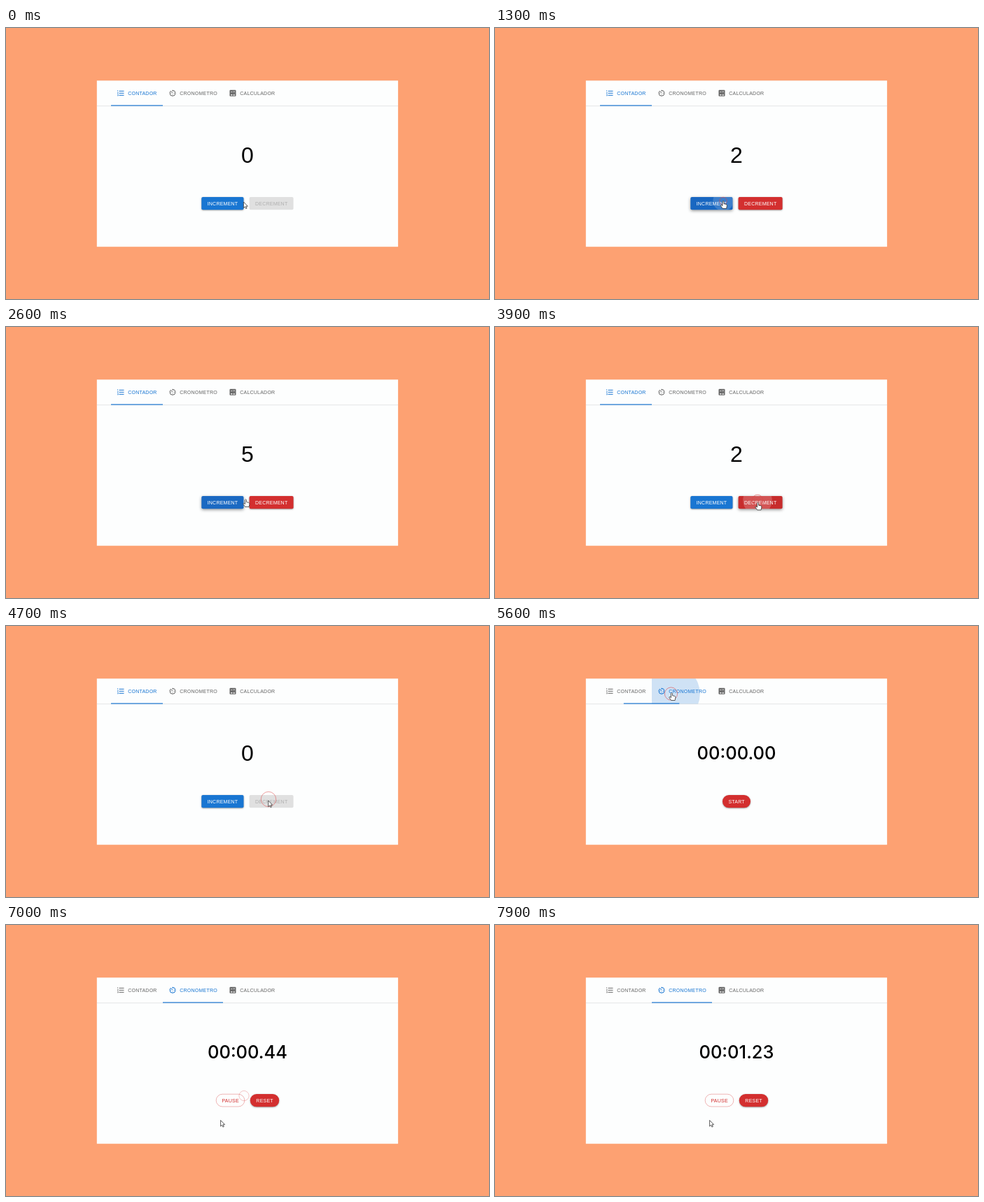
An HTML page with a canvas for the animation above (8000 ms loop, 690x388 px).

```html
<!DOCTYPE html>
<html lang="es">
<head>
<meta charset="utf-8">
<title>Contador</title>
<style>
html, body { margin: 0; width: 100%; height: 100%; overflow: hidden; background: #fda172; }
canvas { display: block; width: 690px; height: 388px; }
</style>
</head>
<body>
<canvas id="stage"></canvas>
<script>
const W = 690, H = 388, LOOP = 8000;
const BLUE = '#1976d2', GREY = '#666', RED = '#d32f2f';
const SANS = '"Liberation Sans", Arial, sans-serif';
const HOLD = 130, RIPPLE = 550;
const TAB_SWITCH = 5500, TIMER_START = 6500;

const canvas = document.getElementById('stage');
const dpr = window.devicePixelRatio || 1;
canvas.width = W * dpr;
canvas.height = H * dpr;
const ctx = canvas.getContext('2d');

const clamp = v => Math.max(0, Math.min(1, v));
const mix = (a, b, p) => a + (b - a) * p;
const mixRgb = (a, b, p) => `rgb(${a.map((v, i) => Math.round(mix(v, b[i], p)))})`;

// cubic-bezier(.4, 0, .2, 1)
function ease(x) {
  x = clamp(x);
  let lo = 0, hi = 1;
  for (let i = 0; i < 20; i++) {
    const s = (lo + hi) / 2, q = 1 - s;
    if (1.2 * q * q * s + .6 * q * s * s + s * s * s < x) lo = s; else hi = s;
  }
  return lo * lo * (3 - 2 * lo);
}

const inc = { x: 279.3, w: 60.2, label: 'INCREMENT', base: [25, 118, 210], dark: [21, 101, 192], hover: [110, 2580] };
const dec = { x: 347.6, w: 63, label: 'DECREMENT', base: [211, 47, 47], dark: [198, 40, 40], hover: [2660, 4700] };
const start = { x: 325, w: 40, r: 9.1, label: 'START', base: dec.base, dark: dec.dark, hover: [6330, 6500] };
const reset = { x: 348.8, w: 41.4, r: 9.1, label: 'RESET', base: dec.base, dark: dec.dark, hover: [9000, 9999] };
const tabs = [
  { x: 150, w: 74, label: 'CONTADOR', icon: listIcon },
  { x: 224, w: 86, label: 'CRONOMETRO', icon: timerIcon },
  { x: 310, w: 83, label: 'CALCULADOR', icon: calcIcon }
];

const press = (on, t, x, y, life = 250, size = 12) => ({ on, t, up: t + HOLD, x, y, life, size });
const clicks = [
  ...[780, 1150, 1490, 1820, 2120].map(t => press(inc, t, 326, 247.5)),
  ...[3040, 3390, 3700, 4080, 4420].map(t => press(dec, t, 375, 248)),
  press(tabs[1], TAB_SWITCH - HOLD, 251.5, 97),
  press(start, TIMER_START - HOLD, 340, 244.5, 600, 7.2)
];

// time, x, y, hand
const path = [
  [0, 339.4, 249, 0], [90, 339.4, 249, 0], [110, 336, 248.5, 1], [250, 326, 247.5, 1],
  [2520, 326, 247.5, 1], [2600, 342.5, 246.5, 1], [2800, 375.5, 251, 1],
  [4560, 375.5, 251, 0], [4680, 375.5, 251, 0], [5100, 256, 108, 1], [5200, 252.5, 95.5, 1],
  [6120, 252.5, 95.5, 1], [6170, 262, 112, 0], [6340, 340, 246, 1],
  [6540, 340, 246, 0], [6850, 306.6, 279.6, 0], [LOOP, 306.6, 279.6, 0]
];

function text(str, x, y, color, size = 7.06, align = 'left') {
  ctx.font = `${size}px ${SANS}`;
  ctx.letterSpacing = size < 10 ? '.2px' : '0px';
  ctx.textAlign = align;
  ctx.fillStyle = color;
  ctx.fillText(str, x, y);
}

function box(x, y, w, h, r) {
  ctx.beginPath();
  ctx.roundRect(x, y, w, h, r);
}

function disc(x, y, r) {
  ctx.beginPath();
  ctx.arc(x, y, r, 0, Math.PI * 2);
}

function line(...p) {
  ctx.beginPath();
  for (let i = 0; i < p.length; i += 2) ctx.lineTo(p[i], p[i + 1]);
  ctx.stroke();
}

function listIcon() {
  for (const y of [5, 11, 17]) ctx.fillRect(7, y, 14, 2);
  ctx.fill(new Path2D('M2 17h2v.5H3v1h1v.5H2v1h3v-4H2zM3 8h1V4H2v1h1zM2 11h1.8L2 13.1v.9h3v-1H3.2L5 10.9V10H2z'));
}

function timerIcon() {
  ctx.lineWidth = 2;
  ctx.beginPath();
  ctx.arc(12, 12, 8, -Math.PI / 2, Math.PI * 1.23);
  ctx.stroke();
  line(12, 3, 12, 7);
  line(5.9, 5.5, 12.7, 12.3);
  for (const [x, y] of [[7, 12], [17, 12], [12, 17]]) { disc(x, y, 1); ctx.fill(); }
}

function calcIcon() {
  box(3, 3, 18, 18, 2);
  ctx.fill();
  ctx.strokeStyle = '#fff';
  ctx.lineWidth = 1.5;
  line(6.2, 8.5, 11.2, 8.5);
  line(13, 15.7, 18, 15.7);
  line(13, 18.2, 18, 18.2);
  line(6, 17, 11, 17);
  line(8.5, 14.5, 8.5, 19.5);
  line(13.7, 6.3, 17.3, 9.9);
  line(17.3, 6.3, 13.7, 9.9);
}

// Ripples are clipped to the current path.
function ripples(owner, t, y, h, color) {
  ctx.save();
  ctx.clip();
  ctx.fillStyle = color;
  for (const c of clicks) {
    if (c.on !== owner || t < c.t || t > c.up + RIPPLE) continue;
    const e = ease((t - c.t) / RIPPLE);
    const rx = Math.max(c.x - owner.x, owner.x + owner.w - c.x) + 1;
    const ry = Math.max(c.y - y, y + h - c.y) + 1;
    ctx.globalAlpha = mix(.1, .3, e) * (1 - ease((t - c.up) / RIPPLE));
    disc(c.x, c.y, Math.hypot(rx, ry) * e);
    ctx.fill();
  }
  ctx.restore();
}

function button(b, t, disabled) {
  const y = 242, h = 18.3;
  const [from, to] = b.hover;
  const p = ease((t - from) / 250) - ease((t - to) / 250);
  ctx.save();
  box(b.x, y, b.w, h, b.r || 2);
  if (disabled) {
    ctx.fillStyle = '#e0e0e0';
    ctx.fill();
  } else {
    ctx.shadowColor = 'rgba(0,0,0,.42)';
    ctx.shadowBlur = mix(2.2, 4.5, p) * dpr;
    ctx.shadowOffsetY = mix(.8, 1.4, p) * dpr;
    ctx.fillStyle = mixRgb(b.base, b.dark, p);
    ctx.fill();
  }
  ctx.restore();
  text(b.label, b.x + b.w / 2 + .1, 253.7, disabled ? '#b0b0b0' : '#fff', 7.06, 'center');
  if (!disabled) {
    box(b.x, y, b.w, h, b.r || 2);
    ripples(b, t, y, h, '#fff');
  }
}

function drawTabs(t) {
  const active = t < TAB_SWITCH ? 0 : 1;
  ctx.fillStyle = '#e0e2e3';
  ctx.fillRect(130, 111.3, 430, .8);
  tabs.forEach((tab, i) => {
    const color = i === active ? BLUE : GREY;
    ctx.save();
    ctx.translate(tab.x + 8, 87.3);
    ctx.scale(.5, .5);
    ctx.fillStyle = ctx.strokeStyle = color;
    tab.icon();
    ctx.restore();
    text(tab.label, tab.x + 24.2, 95.6, color);
    box(tab.x, 75.3, tab.w, 36.2, 0);
    ripples(tab, t, 75.3, 36.2, BLUE);
  });
  const p = ease((t - TAB_SWITCH) / 300);
  ctx.fillStyle = BLUE;
  ctx.fillRect(mix(150, 224, p), 110.4, mix(74, 86, p), 1.2);
}

function drawCounter(t) {
  let n = 0;
  for (const c of clicks) {
    if (t < c.up) continue;
    if (c.on === inc) n++;
    if (c.on === dec) n--;
  }
  text(n, 345, 193.3, '#000', 32, 'center');
  button(inc, t);
  button(dec, t, n === 0);
}

function drawTimer(t) {
  const cs = Math.max(0, Math.floor((t - TIMER_START) * .0878 + .2));
  const two = v => String(v).padStart(2, '0');
  ctx.font = '500 25.5px Inter, "Open Sans", sans-serif';
  ctx.letterSpacing = '0px';
  ctx.textAlign = 'center';
  ctx.fillStyle = '#000';
  ctx.fillText(`00:${two(Math.floor(cs / 100))}.${two(cs % 100)}`, 345, 191);
  if (t < TIMER_START) return button(start, t);
  box(300.2, 242.2, 40.6, 17.8, 8.9);
  ctx.strokeStyle = 'rgba(211,47,47,.5)';
  ctx.lineWidth = .7;
  ctx.stroke();
  text('PAUSE', 320.6, 253.7, RED, 7.06, 'center');
  button(reset, t);
}

function drawRing(t) {
  for (const c of clicks) {
    const u = (t - c.up) / c.life;
    if (t < c.t || u > 1) continue;
    const v = clamp(u);
    disc(c.x, c.y, mix(4, c.size, 1 - (1 - v) ** 2));
    ctx.strokeStyle = `rgba(222,70,70,${.65 * (1 - v ** 4)})`;
    ctx.lineWidth = .9;
    ctx.stroke();
  }
}

const arrow = new Path2D('M0 0V8.6L2 6.8 3.3 9.6 4.7 9 3.4 6.2H6z');
const hand = new Path2D('M-1 1Q0-.7 1 1V4.2L4 4.8Q5.6 5.2 5.4 7L4.6 11H-.8L-3.6 7Q-3.8 5.6-2.4 6L-1 7z');

function drawCursor(t) {
  let i = 0;
  while (i < path.length - 2 && t >= path[i + 1][0]) i++;
  const a = path[i], b = path[i + 1];
  const u = clamp((t - a[0]) / (b[0] - a[0]));
  const p = u * u * (3 - 2 * u);
  const shape = a[3] ? hand : arrow;
  ctx.save();
  ctx.translate(mix(a[1], b[1], p), mix(a[2], b[2], p));
  ctx.fillStyle = '#fff';
  ctx.strokeStyle = '#333';
  ctx.lineWidth = .8;
  ctx.lineJoin = 'round';
  ctx.fill(shape);
  ctx.stroke(shape);
  ctx.restore();
}

function draw(now) {
  const t = now % LOOP;
  ctx.setTransform(dpr, 0, 0, dpr, 0, 0);
  ctx.fillStyle = '#fda172';
  ctx.fillRect(0, 0, W, H);
  ctx.fillStyle = '#fdfefe';
  ctx.fillRect(129.8, 75.3, 430.3, 237.9);
  drawTabs(t);
  (t < TAB_SWITCH ? drawCounter : drawTimer)(t);
  drawRing(t);
  drawCursor(t);
}

let origin;
function tick(now) {
  origin ??= now;
  draw(now - origin);
  requestAnimationFrame(tick);
}
requestAnimationFrame(tick);
</script>
</body>
</html>
```
